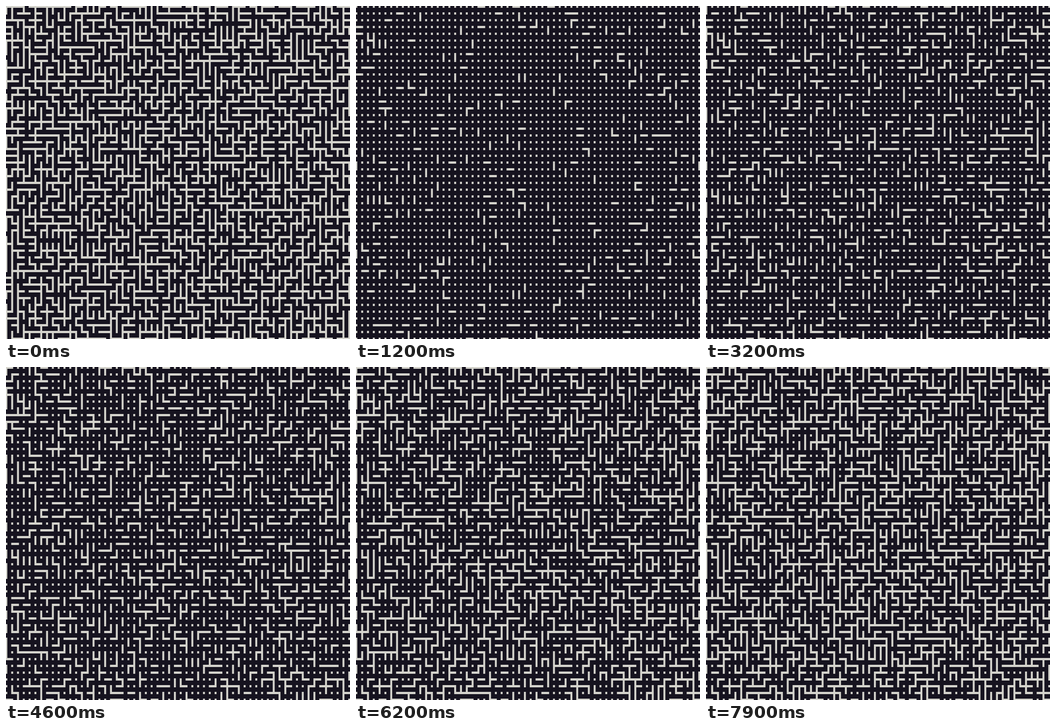
Recreate the animation shown at these times as an HTML page with a canvas. Size 760 by 737 pixels, loop 8 s.

```html
<!DOCTYPE html>
<html lang="en">
<head>
<meta charset="utf-8">
<title>Growing maze</title>
<style>
  html, body { margin: 0; width: 100%; height: 100%; overflow: hidden; background: #16131f; }
  canvas { display: block; width: 100%; height: 100%; }
</style>
</head>
<body>
<canvas id="stage" width="760" height="737"></canvas>
<script>
const W = 760, H = 737, LOOP = 8000;
const COLS = 60, ROWS = 50;
const UNIT_X = 4.28, UNIT_Y = 5;      // wall thickness; a corridor is two units
const LEFT = -1.34, TOP = -1;
const GROUND = '#16131f', INK = '#d4d3cc';
const HOLD = 300, STEP = 100, PAUSE = 2600, PER_STEP = 33;

const ctx = document.getElementById('stage').getContext('2d');

function seeded(seed) {
  return () => {
    seed = (seed + 0x6D2B79F5) | 0;
    let t = Math.imul(seed ^ (seed >>> 15), 1 | seed);
    t = (t + Math.imul(t ^ (t >>> 7), 61 | t)) ^ t;
    return ((t ^ (t >>> 14)) >>> 0) / 4294967296;
  };
}

// Randomised Kruskal: the accepted edges, in the order they were joined.
function growTree(seed) {
  const rand = seeded(seed);
  const edges = [];
  for (let r = 0; r < ROWS; r++) {
    for (let c = 0; c < COLS; c++) {
      if (c < COLS - 1) edges.push({ c, r, dc: 1, dr: 0 });
      if (r < ROWS - 1) edges.push({ c, r, dc: 0, dr: 1 });
    }
  }
  for (let i = edges.length - 1; i > 0; i--) {
    const j = Math.floor(rand() * (i + 1));
    [edges[i], edges[j]] = [edges[j], edges[i]];
  }
  const parent = Array.from({ length: COLS * ROWS }, (_, i) => i);
  const find = i => {
    while (parent[i] !== i) i = parent[i] = parent[parent[i]];
    return i;
  };
  return edges.filter(e => {
    const a = find(e.r * COLS + e.c);
    const b = find((e.r + e.dr) * COLS + e.c + e.dc);
    parent[a] = b;
    return a !== b;
  });
}

// A node is a bar of no length.
function bar(c, r, dc, dr) {
  ctx.rect(
    LEFT + 3 * c * UNIT_X, TOP + 3 * r * UNIT_Y,
    (3 * dc + 1) * UNIT_X, (3 * dr + 1) * UNIT_Y
  );
}

function draw(edges) {
  ctx.fillStyle = GROUND;
  ctx.fillRect(0, 0, W, H);
  ctx.fillStyle = INK;
  ctx.beginPath();
  for (let r = 0; r < ROWS; r++) {
    for (let c = 0; c < COLS; c++) bar(c, r, 0, 0);
  }
  for (const e of edges) bar(e.c, e.r, e.dc, e.dr);
  ctx.fill();
}

const finished = growTree(411);
const growing = growTree(2087);
let shown = -1;

function stepAt(t) {
  if (t < HOLD) return 0;
  return Math.floor((t - HOLD) / STEP) + 1 - (t >= PAUSE ? 1 : 0);
}

function frame() {
  const step = stepAt(performance.now() % LOOP);
  if (step !== shown) {
    shown = step;
    draw(step === 0 ? finished : growing.slice(0, step * PER_STEP));
  }
  requestAnimationFrame(frame);
}
frame();
</script>
</body>
</html>
```
